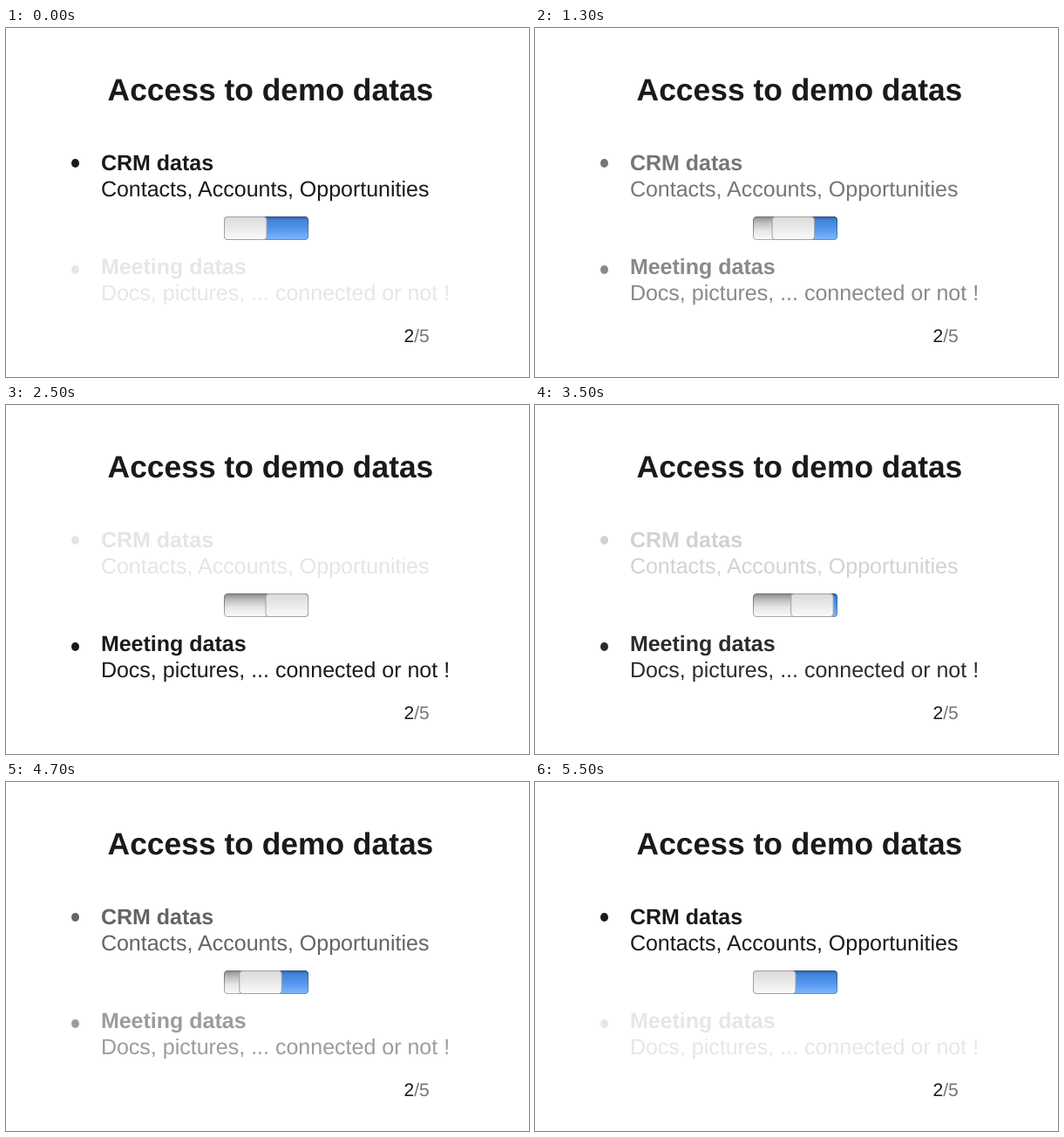
Animation, 600 px wide and 400 px high, one loop 6 s. Source, as an HTML page:

```html
<!DOCTYPE html>
<html lang="en">
<head>
<meta charset="utf-8">
<title>Access to demo datas</title>
<style>
  html, body { margin: 0; width: 100%; height: 100%; overflow: hidden; background: #fff; }
  svg { display: block; width: 600px; height: 400px; font: 25px "Liberation Sans", Arial, sans-serif; fill: #1a1a1a; text-rendering: geometricPrecision; }
  .b { font-weight: bold; }
</style>
</head>
<body>
<svg viewBox="0 0 600 400">
  <defs>
    <linearGradient id="off" x2="0" y2="1">
      <stop offset="0" stop-color="#8c8c8c"/>
      <stop offset=".25" stop-color="#bcbcbc"/>
      <stop offset=".6" stop-color="#e6e6e6"/>
      <stop offset="1" stop-color="#fafafa"/>
    </linearGradient>
    <linearGradient id="on" x2="0" y2="1">
      <stop offset="0" stop-color="#2f66ad"/>
      <stop offset=".15" stop-color="#4383d6"/>
      <stop offset=".5" stop-color="#4f95ec"/>
      <stop offset="1" stop-color="#7fb5fb"/>
    </linearGradient>
    <linearGradient id="grip" x2="0" y2="1">
      <stop offset="0" stop-color="#dadada"/>
      <stop offset="1" stop-color="#fafafa"/>
    </linearGradient>
    <linearGradient id="offEdge" x2="0" y2="1">
      <stop offset="0" stop-color="#6e6e6e"/>
      <stop offset="1" stop-color="#a8a8a8"/>
    </linearGradient>
    <linearGradient id="onEdge" x2="0" y2="1">
      <stop offset="0" stop-color="#2c4f7c"/>
      <stop offset="1" stop-color="#5c8cc8"/>
    </linearGradient>
    <clipPath id="right"><rect id="cut" x="274" y="214" width="80" height="32"/></clipPath>
  </defs>

  <text class="b" x="116.6" y="83" font-size="35.4">Access to demo datas</text>

  <g id="crm">
    <ellipse cx="79.5" cy="155" rx="4.5" ry="5"/>
    <text class="b" x="108.9" y="163">CRM datas</text>
    <text x="108.9" y="193">Contacts, Accounts, Opportunities</text>
  </g>
  <g id="meeting">
    <ellipse cx="79.5" cy="277" rx="4.5" ry="5"/>
    <text class="b" x="108.9" y="282">Meeting datas</text>
    <text x="108.9" y="312">Docs, pictures, ... connected or not !</text>
  </g>

  <rect x="250.5" y="216.5" width="96" height="26" rx="3.5" fill="url(#off)" stroke="url(#offEdge)"/>
  <g clip-path="url(#right)">
    <rect x="250.5" y="216.5" width="96" height="26" rx="3.5" fill="url(#on)" stroke="url(#onEdge)"/>
  </g>
  <rect id="knob" x="250.5" y="216.5" width="48.5" height="26" rx="3.5" fill="url(#grip)" stroke="#a0a0a0"/>

  <text x="456.5" y="360" font-size="21">2<tspan fill="#757575">/5</tspan></text>
</svg>
<script>
  const LOOP = 6000, STEP = 200, LAST = 11, TRAVEL = 47.5;
  const [crm, meeting, knob, cut] =
    ['crm', 'meeting', 'knob', 'cut'].map(id => document.getElementById(id));

  // Steps begun since a given start, limited to the full slide.
  const steps = (t, start) => Math.max(0, Math.min(LAST, Math.floor((t - start) / STEP) + 1));

  function draw(now) {
    const t = now % LOOP;
    const p = (steps(t, 500) - steps(t, 3500)) / LAST;
    crm.style.opacity = 1 - .89 * p;
    meeting.style.opacity = .1 + .9 * p;
    knob.setAttribute('x', 250.5 + TRAVEL * p);
    cut.setAttribute('x', 274 + TRAVEL * p);
    requestAnimationFrame(draw);
  }
  draw(0);
</script>
</body>
</html>
```
